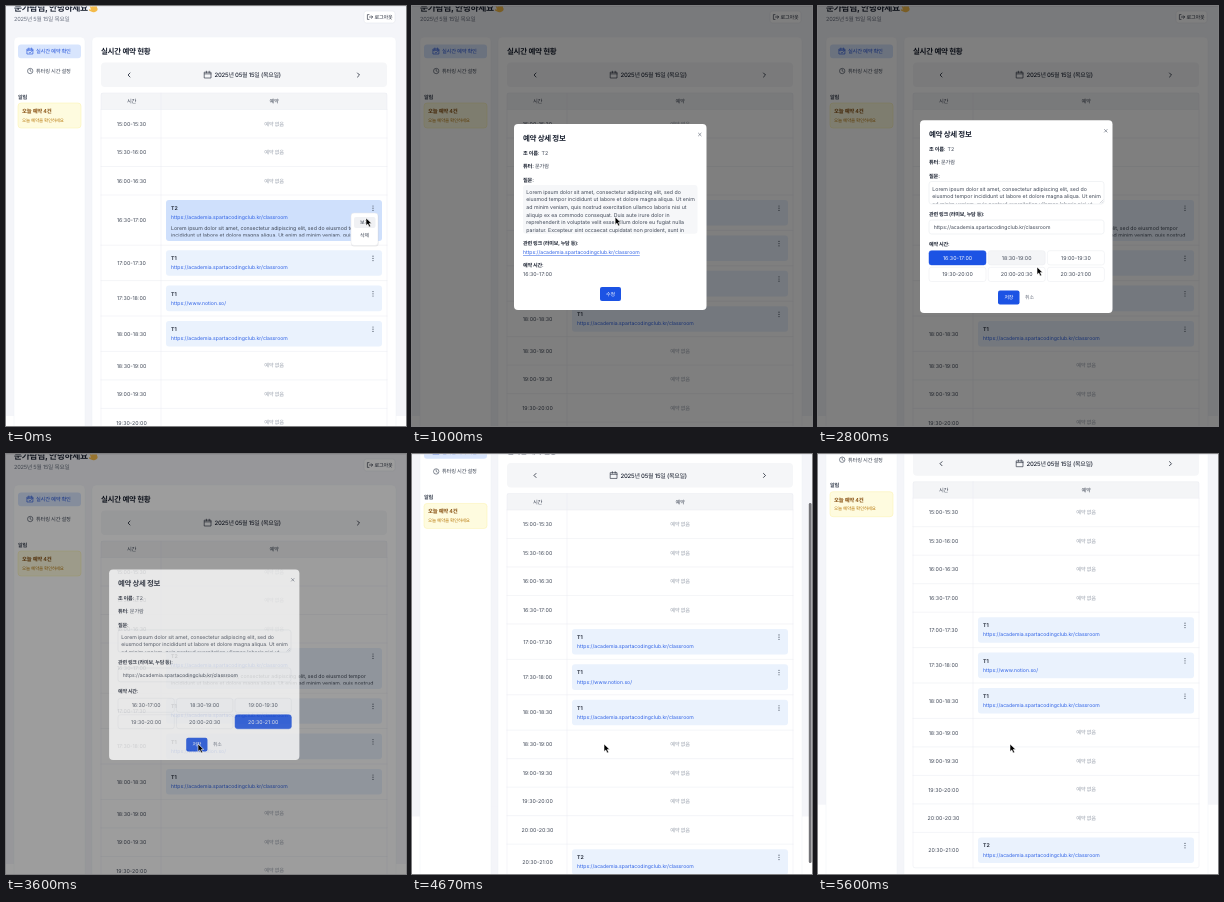
Write an HTML page that moves like this. It is 400x420 px and loops after 5.67 s.

```html
<!DOCTYPE html>
<html lang="ko">
<head>
<meta charset="utf-8">
<style>
html, body { margin: 0; width: 100%; height: 100%; overflow: hidden; background: #fff; }
svg { display: block; width: 100vw; height: 100vh; }
text { font-family: Inter, 'Noto Sans CJK KR', 'Noto Sans CJK', sans-serif; text-rendering: geometricPrecision; white-space: pre; }
</style>
</head>
<body>
<svg id="stage" viewBox="0 0 400 420"></svg>
<script>
const LOOP = 5670, FRAME = 1000 / 15;
const INK = '#1a2130', BODY = '#3f4756', MUTED = '#6b7280', FAINT = '#9ca3af', LINE = '#e9ebf0', BLUE = '#1c53e4', LINK = '#2f62e6';
const TUTOR = '문가람';
const CLASSROOM = 'https://academia.spartacodingclub.kr/classroom';
const QUESTION = [
  'Lorem ipsum dolor sit amet, consectetur adipiscing elit, sed do',
  'eiusmod tempor incididunt ut labore et dolore magna aliqua. Ut enim',
  'ad minim veniam, quis nostrud exercitation ullamco laboris nisi ut',
  'aliquip ex ea commodo consequat. Duis aute irure dolor in',
  'reprehenderit in voluptate velit esse cillum dolore eu fugiat nulla',
  'pariatur. Excepteur sint occaecat cupidatat non proident, sunt in',
  'culpa qui officia deserunt mollit anim id est laborum.'];
const PREVIEW = [
  'Lorem ipsum dolor sit amet, consectetur adipiscing elit, sed do eiusmod tempor',
  'incididunt ut labore et dolore magna aliqua. Ut enim ad minim veniam, quis nostrud'];

// Cursor tip over time: [ms, x, y]
const PATH = [[0, 360, 212], [470, 360, 212], [1070, 197, 211], [1670, 197, 211], [1733, 196, 240], [2200, 197, 286],
  [2400, 197, 286], [2667, 201, 251], [2800, 219, 261], [2933, 256, 266], [3100, 256, 266], [3533, 192, 290], [LOOP, 192, 290]];

const ramp = (t, from, to) => Math.max(0, Math.min(1, (t - from) / (to - from)));

function cursorAt(t) {
  const i = Math.max(1, PATH.findIndex(key => key[0] >= t));
  const [t0, x0, y0] = PATH[i - 1], [t1, x1, y1] = PATH[i];
  const u = ramp(t, t0, t1), e = u * u * (3 - 2 * u);
  return [x0 + (x1 - x0) * e, y0 + (y1 - y0) * e];
}

// y is the vertical middle of the text
function text(str, x, y, { size = 5.25, fill = BODY, weight = 400, anchor = 'start', extra = '' } = {}) {
  const spacing = /[가-힣]/.test(str) ? -0.04 * size : 0;
  return `<text x="${x}" y="${y + size * 0.36}" font-size="${size}" fill="${fill}" font-weight="${weight}" text-anchor="${anchor}" letter-spacing="${spacing}" ${extra}>${str}</text>`;
}
const centered = (str, x, y, options = {}) => text(str, x, y, { anchor: 'middle', ...options });

function box(x0, y0, x1, y1, fill, radius = 0, stroke = 'none', extra = '') {
  return `<rect x="${x0}" y="${y0}" width="${x1 - x0}" height="${y1 - y0}" rx="${radius}" fill="${fill}" stroke="${stroke}" stroke-width=".5" ${extra}/>`;
}
const stroke = (d, color, width = 0.6) =>
  `<path d="${d}" fill="none" stroke="${color}" stroke-width="${width}" stroke-linecap="round" stroke-linejoin="round"/>`;
const clipped = (id, x0, y0, x1, y1, content) =>
  `<clipPath id="${id}">${box(x0, y0, x1, y1, '#000')}</clipPath><g clip-path="url(#${id})">${content}</g>`;
const lines = (list, x, y, step, options) => list.map((str, i) => text(str, x, y + i * step, options)).join('');
const calendar = (x, y, s, color) =>
  stroke(`M${x} ${y + 1}h${s}v${s - 0.6}h${-s}zM${x} ${y + s * 0.42}h${s}M${x + s * 0.28} ${y}v1.6M${x + s * 0.72} ${y}v1.6`, color);

function header() {
  return text(TUTOR + '님, 안녕하세요', 8, 2, { size: 8.8, weight: 700, fill: INK }) +
    `<g transform="rotate(-25 88 2)"><rect x="84.5" y="0" width="6.5" height="6" rx="2.6" fill="#f4bb4a"/>` +
    stroke('M85.5 2V-3M87.3 1V-4M89 1V-3.6M90.5 2V-2.4M85 4l-1.8-2', '#f4bb4a', 1.5) + '</g>' +
    text('2025년 5월 15일 목요일', 8, 13, { size: 5.7, fill: MUTED }) +
    box(358, 5, 389, 17, '#fff', 2.5, '#dfe2e8') +
    stroke('M363 8.6h-1.6v4.8h1.6M363.4 11h3.2M365.4 9.7l1.3 1.3-1.3 1.3', INK) +
    text('로그아웃', 368.5, 11, { size: 5.1, weight: 500, fill: INK });
}

function sidebar() {
  return box(8, 31, 79, 510, '#fff', 4, '#eff1f5') +
    box(12, 38.5, 75, 52.3, '#d8e5fd', 3) + calendar(21.3, 42, 5.6, '#1d4ed8') +
    stroke('M23 46.2l.9.8 1.6-1.5', '#1d4ed8') +
    text('실시간 예약 확인', 30, 45.3, { weight: 500, fill: '#1d4ed8' }) +
    '<circle cx="24.2" cy="65" r="2.7" fill="none" stroke="#374151" stroke-width=".6"/>' + stroke('M24.2 63.4V65l1.1.7', '#374151') +
    text('튜터링 시간 설정', 30, 65, { weight: 500 }) +
    text('알림', 12, 90.7, { weight: 600 }) +
    box(12, 97, 75, 122, '#fefbdf', 3, '#fbf0a8') +
    text('오늘 예약 4건', 16, 105, { size: 5.4, weight: 600, fill: '#854d0e' }) +
    text('오늘 예약을 확인하세요', 16, 114, { size: 4.5, fill: '#b8790c' });
}

function booking(y, { team, url, preview, active }) {
  const height = preview ? 41 : 25.6;
  let out = box(160, y + 5, 376, y + 5 + height, active ? '#cfe0fc' : '#eaf2fd', 3) +
    text(team, 165, y + 13.2, { weight: 600, fill: INK }) +
    text(url, 165, y + 22.4, { size: 5.1, fill: LINK });
  for (const dy of [11, 13.2, 15.4]) out += `<circle cx="367" cy="${y + dy}" r=".6" fill="#4b5563"/>`;
  if (preview) out += clipped('preview', 160, y + 28, 376, y + 41.5, lines(PREVIEW, 165, y + 33, 7.55, { size: 5.2 }));
  return out;
}

function schedule({ moved, preview, active }) {
  const entries = {
    [moved ? '20:30' : '16:30']: { team: 'T2', url: CLASSROOM, preview: preview && !moved, active },
    '17:00': { team: 'T1', url: CLASSROOM },
    '17:30': { team: 'T1', url: 'https://www.notion.so/' },
    '18:00': { team: 'T1', url: CLASSROOM }
  };
  const clock = half => `${half >> 1}:${half % 2 ? '30' : '00'}`;
  let out = box(95, 87, 381, 103.5, '#f4f5f7') +
    centered('시간', 125.5, 95.6, { weight: 500 }) + centered('예약', 268, 95.6, { weight: 500 });
  let y = 103.5;
  for (let half = 30; half < 42; half++) {
    const entry = entries[clock(half)];
    const height = !entry ? 28.5 : entry.preview ? 50.2 : 35.4;
    out += stroke(`M95 ${y}H381`, LINE, 0.5) +
      centered(`${clock(half)}-${clock(half + 1)}`, 125.5, y + height / 2, { size: 5.3 }) +
      (entry ? booking(y, entry) : centered('예약 없음', 268, y + 14.2, { fill: FAINT }));
    y += height;
  }
  return out + stroke(`M155 87V${y}`, LINE, 0.5) + box(95, 87, 381, y, 'none', 2, LINE);
}

function page(state) {
  return box(0, 0, 400, 410, '#f4f5f9') + box(79, 400, 86, 510, '#f4f5f9') +
    header() + sidebar() +
    box(86, 31, 390, 510, '#fff', 4, '#eff1f5') +
    text('실시간 예약 현황', 95, 45.3, { size: 7.5, weight: 600, fill: INK }) +
    box(95, 56.5, 381, 81, '#f5f6f8', 4) +
    stroke('M124 67l-2 2 2 2M351.5 67l2 2-2 2', INK, 0.8) +
    calendar(198.6, 65.2, 6.4, INK) +
    text('2025년 05월 15일 (목요일)', 208.5, 69, { size: 6, weight: 500, fill: INK }) +
    schedule(state);
}

function menu() {
  return box(345, 207.8, 372.6, 240.5, '#000', 3, 'none', 'opacity=".08"') + box(345, 207, 372, 239.5, '#fff', 3, '#e5e7eb') +
    box(348, 211, 369.5, 222, '#f0f1f4', 2) +
    centered('보기', 358.5, 216.3, { size: 5 }) + centered('삭제', 358.5, 229.5, { size: 5 });
}

function dialogTop(top) {
  const label = (str, dy) => text(str, 111, top + dy, { weight: 600, size: 5.2, fill: INK });
  return stroke(`M286.5 ${top + 9.2}l2.6 2.6m0-2.6l-2.6 2.6`, MUTED, 0.7) +
    text('예약 상세 정보', 111, top + 14.2, { size: 7.5, weight: 700, fill: INK }) +
    label('조 이름:', 29.2) + text('T2', 129.5, top + 29.2) +
    label('튜터:', 42.3) + text(TUTOR, 123, top + 42.3) + label('질문:', 56);
}

function dialogLower(linkY, timeY) {
  const style = { weight: 600, size: 5.1, fill: INK };
  return text('관련 링크 (라미보, 누담 등):', 111, linkY, style) + text('예약 시간:', 111, timeY, style);
}

function viewDialog(t) {
  const shift = t >= 1460 ? 10.7 : 0;
  const thumb = shift ? 1 - ramp(t, 1950, 2200) : 0;
  return box(102, 118, 294.5, 304, '#fff', 4) + dialogTop(118) +
    box(111, 179, 285.5, 227.8, '#f6f7f9', 3) +
    clipped('question', 111, 179.3, 285.5, 227.5, lines(QUESTION, 114.3, 186 - shift, 7.55, { size: 5.22 })) +
    box(281, 190, 284.4, 226, '#6f6f72', 1.7, 'none', `opacity="${thumb}"`) +
    dialogLower(237.5, 259.5) +
    text(CLASSROOM, 111, 246.2, { size: 5.1, fill: LINK, extra: 'text-decoration="underline"' }) +
    text('16:30-17:00', 111, 268.5, { size: 5.3 }) +
    box(188, 281, 209, 295, BLUE, 2) + centered('수정', 198.5, 288.2, { size: 5, weight: 500, fill: '#fff' });
}

function editDialog(t) {
  const slots = ['16:30-17:00', '18:30-19:00', '19:00-19:30', '19:30-20:00', '20:00-20:30', '20:30-21:00'];
  const selected = t < 2990 ? 0 : 5;
  const hovered = t > 2590 && t < 2860 ? 1 : -1;
  const buttons = slots.map((slot, i) => {
    const x = 111 + (i % 3) * 59.2, y = i < 3 ? 244.7 : 261.3, on = i === selected;
    return box(x, y, x + 57, y + 14.2, on ? BLUE : i === hovered ? '#f4f5f7' : '#fff', 2.5, on ? BLUE : '#e8eaef') +
      centered(slot, x + 28.5, y + 7.2, { size: 5.3, fill: on ? '#fff' : BODY });
  });
  return box(102, 114.3, 294.5, 307, '#fff', 4) + dialogTop(114.3) +
    box(111, 175.5, 286, 198, '#fff', 2.5, '#e3e6eb') +
    clipped('question', 111, 176, 285.5, 197.6, lines(QUESTION.slice(0, 3), 114.3, 182.8, 7.55, { size: 5.22 })) +
    stroke('M282 197l3-3M283.8 197l1.2-1.2', FAINT, 0.4) +
    dialogLower(208.6, 238) +
    box(111, 214, 286, 228, '#fff', 2.5, '#e3e6eb') + text(CLASSROOM, 115.7, 221.1, { size: 5.1 }) +
    buttons.join('') +
    box(180, 284.5, 201.5, 298.5, BLUE, 2) + centered('저장', 190.8, 291.6, { size: 5, weight: 500, fill: '#fff' }) +
    centered('취소', 211.5, 291.6, { size: 5, fill: MUTED });
}

function cursor(t) {
  const [x, y] = cursorAt(t);
  if (t > 1325 && t < 1700) return stroke('M198.8 212.3q1.2 0 1.2.8 0-.8 1.2-.8M200 213v5.2M198.8 219q1.2 0 1.2-.8 0 .8 1.2.8', '#111', 0.6);
  return `<path transform="translate(${x} ${y})" d="M0 0v7.6l1.8-1.6 1.3 3 1.5-.7-1.3-2.9h2.4z" fill="#000" stroke="#fff" stroke-width=".6" stroke-linejoin="round"/>`;
}

function scene(t) {
  const shown = ramp(t, 20, 210) * (1 - ramp(t, 3540, 3800));
  const scroll = 59.3 * (1 - (1 - ramp(t, 4467, 5067)) ** 4);
  const editing = t > 2390;
  const menuOpen = t < 60;
  const zoom = 0.95 + 0.05 * shown;
  const state = { moved: t > 3660, preview: menuOpen || editing, active: menuOpen };
  let out = `<g transform="translate(0 ${-scroll})">${page(state)}</g>` + box(0, 0, 400, 0.5, '#d9dbe0');
  if (menuOpen) out += menu();
  if (shown > 0) {
    out += box(0, 0, 400, 420, '#000', 0, 'none', `opacity="${0.5 * shown}"`) +
      `<g opacity="${shown}" transform="translate(198 211) scale(${zoom}) translate(-198 -211)">${editing ? editDialog(t) : viewDialog(t)}</g>`;
  }
  if (scroll > 0) {
    out += box(396.8, 3 + scroll * 0.97, 399.6, 363 + scroll * 0.97, '#747478', 1.4, 'none', `opacity="${1 - ramp(t, 5130, 5580)}"`);
  }
  return out + cursor(t);
}

const stage = document.getElementById('stage');
const start = performance.now();
let last = -1;
function tick() {
  const frame = Math.floor((((performance.now() - start) % LOOP) + 4) / FRAME);
  if (frame !== last) stage.innerHTML = scene(Math.min(frame * FRAME, LOOP));
  last = frame;
  requestAnimationFrame(tick);
}
tick();
</script>
</body>
</html>
```
